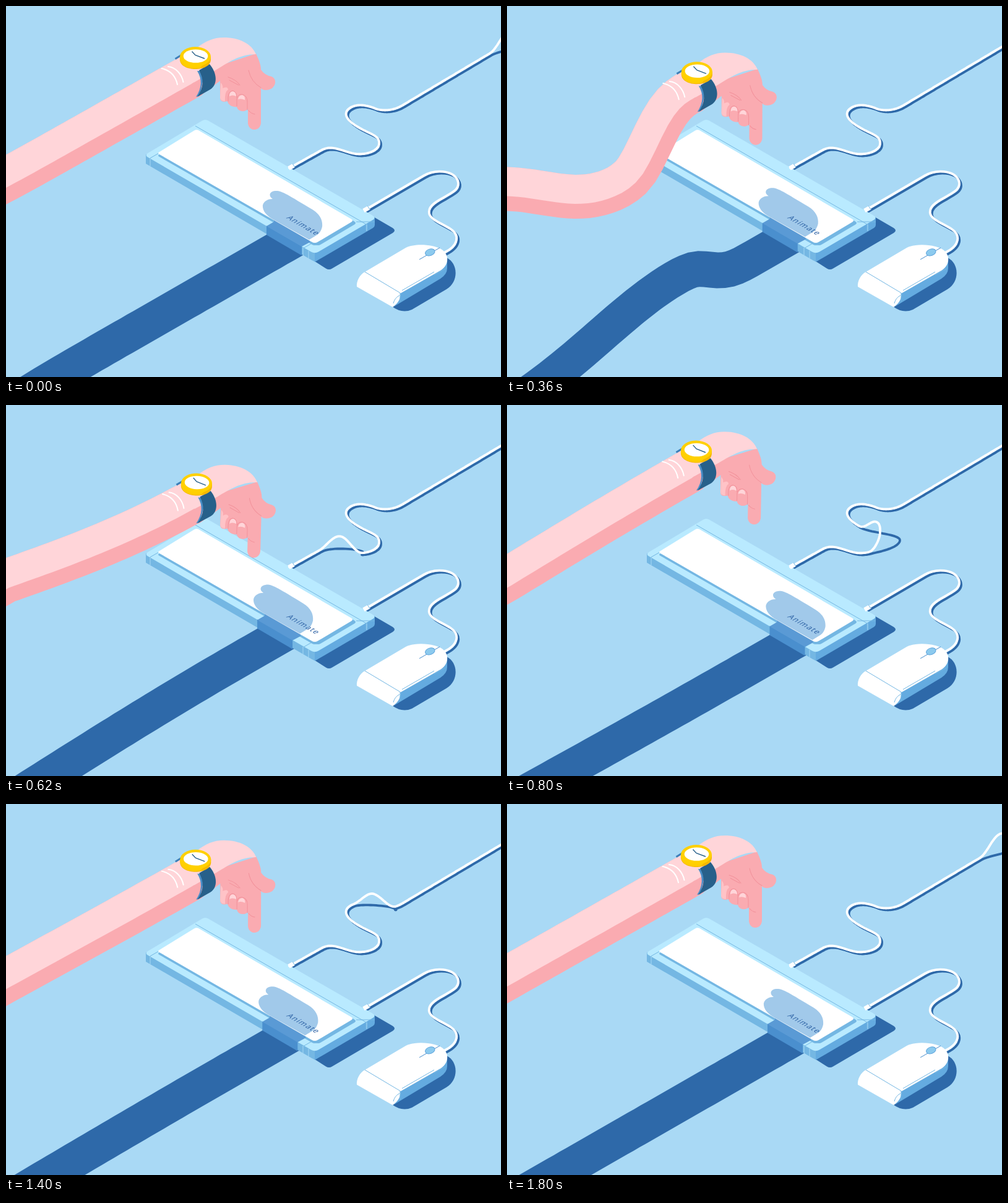
Recreate the animation shown at these times as an HTML page. Size 800 px wide and 600 px high, loop 1820 ms.

```html
<!DOCTYPE html>
<html lang="en">
<head>
<meta charset="utf-8">
<title>Tap</title>
<style>
html, body { margin: 0; width: 100%; height: 100%; overflow: hidden; background: #a9d9f5; }
svg { display: block; width: 800px; height: 600px; }
.floor { fill: #2e69a9; }
.cord, .cordShade { fill: none; stroke: #fff; stroke-width: 3.8; stroke-linecap: round; stroke-linejoin: round; }
.cordShade { stroke: #2e69a9; }
.thin { fill: none; stroke: #74b7e3; stroke-width: 1; }
.crease { fill: none; stroke: #f2929b; stroke-width: 1; stroke-linecap: round; }
.light { fill: #ffd5d9; }
.dark { fill: #faabb1; }
text { font: 12.5px "Open Sans", "Noto Sans", sans-serif; letter-spacing: 1.15px; fill: #2a5fa3; }
</style>
</head>
<body>
<svg viewBox="0 0 800 600">
  <defs>
    <path id="keyTop" d="M248 236 L304 201.500 Q308 199 312 201.500 L558 344.500 Q562 347 558 349.500 L504 381.500 Q499 384.500 494 381.500 L248 240 Q244 238 248 236Z"/>
    <clipPath id="onKey"><use href="#keyTop"/></clipPath>
    <clipPath id="onSide"><path d="M226 242 L496 399 V414 L226 256Z"/></clipPath>
    <path id="mouseCord" d="M580 330 L675 274.500 C693 264 722 265 730 282 C735 296 722 301 707 310 C690 319 682 326 684 336 C687 346 705 352 719 361 C734 371 731 388 708 399"/>
  </defs>
  <rect width="800" height="600" fill="#a9d9f5"/>

  <!-- floor shadows -->
  <path class="floor" d="M485 404 L517 424.500 Q522 427.500 527 424.500 L625 367 Q631 363 625 359 L594 341Z"/>
  <path class="floor" d="M624 486 Q640 498 656 491 L712 458 C732 446 731 416 712 407Z"/>
  <path class="floor" id="armShade"/>
  <use class="cordShade" href="#mouseCord" x="3" y="3"/>
  <path class="cordShade" id="cordShade"/>

  <!-- keyboard -->
  <path fill="#74b7e3" d="M226 240 V255 L494 411 Q500 414 500 414 V398Z"/>
  <path fill="#64abe0" d="M499 396 V414 L593 359 Q596 357 596 354 V341Z"/>
  <path fill="#b9eaff" d="M230 237.500 L317 185.500 Q322 182.500 327 185.500 L592 338.500 Q599 342.500 592 346.500 L505 397.500 Q499 401 493 397.500 L230 245 Q223 241.500 230 237.500Z"/>
  <path class="thin" d="M306 194 L582 353 V363 M233 246 L247 238 M233 246 V259 M480 392 L494 384 M566 349 L596 349"/>
  <path class="thin" style="stroke:#a5d8f5" d="M233 247 V259 M480 391 V403 M489 396 V408 M583 353 V364"/>
  <use href="#keyTop" fill="#74b7e3" x="5" y="4"/>
  <use href="#keyTop" fill="#74b7e3" y="4"/>
  <g id="sideShade" clip-path="url(#onSide)"><path class="slide" fill="#4a8fce" d="M421 354 V374 L478 407 V387Z"/></g>
  <path class="slide" fill="#5a9ad5" d="M433 343 V349 L421 356 L478 389 L491 382 V374Z"/>
  <use href="#keyTop" fill="#fff"/>
  <g clip-path="url(#onKey)"><path class="slide" fill="#a1c9ea" d="M433 346 C420 339 414 330 415 322 C417 315 424 312 431 312 C424 308 425 300 435 299 C445 298 455 305 495 329 C508 337 512 347 511 357 Q509 366 503 370 L490 378Z"/></g>
  <text transform="matrix(.866 .5 -.866 .5 452.500 343)">Animate</text>

  <!-- cables and plugs -->
  <path class="cord" id="cord"/>
  <use class="cord" href="#mouseCord"/>
  <path d="M457 262.500 L465 258 M578 331 L587 326" stroke="#fff" stroke-width="7"/>
  <path class="thin" d="M463 255 L467 261 M584 323 L588 329"/>

  <!-- mouse -->
  <path fill="#64abe0" d="M637 462 L713 408 V424 Q713 434 702 441 L627 486Z"/>
  <path fill="#fff" d="M580 430 L646 391 C662 383 690 386 703 393 C718 402 716 421 700 429 L637 465 C628 470 623 478 625 487 L567 454 C566 445 572 434 580 430Z"/>
  <path fill="#fff" d="M637 465 C638 472 635 480 625 487 C621 478 628 468 637 465Z"/>
  <path class="thin" d="M580 430 L637 464 V478 M640 460 L692 430 M692 435 L710 425 M636 468 Q628 472 626 481"/>
  <path d="M668 410 L701 391" stroke="#4a8fce" fill="none"/>
  <ellipse cx="685.500" cy="398.500" rx="8" ry="5.300" transform="rotate(-20 685 399)" fill="#8ccaee" stroke="#5fa5dc"/>

  <!-- arm and hand -->
  <path class="dark" id="armDark"/>
  <path class="light" id="armLight"/>
  <g id="hand">
    <path class="dark" d="M300 126 L340 98 L404 77 C409 88 412 95 412 103 Q418 112 429 114 C437 117 437 127 430 133 C424 137 415 137 412 133 V189 C411 203 393 204 391 190 V166 C388 172 375 172 373 163 C368 164 359 161 358 154 C350 156 346 154 346 148 V121 L312 147Z"/>
    <path class="light" d="M277 90 L282 82.500 L308 68 C322 57 335 51 352 51 C377 51 397 61 404 78 C377 78 360 91 340 103 L304 123.500Z"/>
    <path fill="#ffc3c7" d="M347 124 Q351 128 350 133 Q358 129 359 135 Q353 139 354 154 Q346 154 346 148Z"/>
    <path class="light" d="M361 146 Q361 138 367 138 Q372 139 372 146 Q366 143 361 146Z M375 151 Q376 144 382 144 Q387 146 386 152 Q380 149 375 151Z"/>
    <path class="crease" d="M359 154 Q358 138 366 137 Q373 138 373 148 M373 162 V150 Q375 142 382 143 Q390 145 390 155 V168 M359 115 Q372 119 378 128 M361 120 L376 128 M392 104 Q396 123 412 132 M392 169 Q396 174 402 175"/>
    <path d="M262 98 C274 99 284 110 286.500 123 M251.500 101 C265 104 274 113 277 127" fill="none" stroke="#fff" stroke-width="2" stroke-linecap="round"/>
    <path d="M273.500 85.500 L284 79" stroke="#3d7fb8" stroke-width="3"/>
    <path fill="#4a8ec7" d="M309 105 C317 118 317 132 307 147 L313 145 L322 105Z"/>
    <path fill="#27608a" d="M312 104 C320 118 320 132 309 147 L330 135 C343 127 341 108 329 94Z"/>
    <path fill="#f5b800" d="M281 82 V87 C282 107 330 107 331 87 V82Z"/>
    <path fill="#ffcd00" d="M281 82 V86 C284 102 305 102 314 100 L331 82Z"/>
    <ellipse cx="306" cy="82" rx="25" ry="16" fill="#ffd000"/>
    <ellipse cx="306.500" cy="81" rx="19.800" ry="10.800" fill="#fff"/>
    <path d="M300.500 73.500 L306 79.500 L321 85" fill="none" stroke="#27608a" stroke-width="1.400"/>
  </g>
</svg>
<script>
const LOOP = 1820;
const $ = id => document.getElementById(id);
const clamp = x => Math.max(0, Math.min(1, x));
const smooth = x => (1 - Math.cos(Math.PI * clamp(x))) / 2;

// Keys are [time, value] pairs.
function track(t, keys, ease = smooth) {
  let i = 1;
  while (i < keys.length - 1 && t > keys[i][0]) i++;
  const [t0, a] = keys[i - 1], [t1, b] = keys[i];
  return a + (b - a) * ease((t - t0) / (t1 - t0));
}

const DROP = [[0, 0], [300, 0], [470, 85], [800, -8.5], [1160, 11], [1820, 0]];
const SLIDE = [[0, 0], [300, 0], [470, -29], [800, 3.5], [1160, -9.5], [1820, 0]];
const SHOULDER = [[0, 0], [330, 0], [480, 6], [760, 0], [1080, 11], [1640, 0], [1820, 0]];
const TURN = [[0, 0], [330, 0], [470, 2], [800, 1], [1080, .2], [1820, 0]];
const PULSE = [[430, 8], [480, 30], [800, 172], [1080, 217], [1400, 290], [1620, 394], [1800, 516], [1820, 537], [1920, 640]];

const line = pts => "M" + pts.map(p => p[0].toFixed(1) + " " + p[1].toFixed(1)).join("L");

// Band between two offsets along the normal of y = f(x).
function band(f, x0, x1, near, far) {
  const a = [], b = [];
  for (let x = x0; x <= x1; x += 10) {
    const y = f(x), slope = (f(x + .5) - f(x - .5)), n = Math.hypot(1, slope);
    const put = (list, off) => list.push([x - slope / n * off, y + off / n]);
    put(a, near);
    put(b, far);
  }
  return line(a.concat(b.reverse())) + "Z";
}

// Travelling dip with a small counter swing ahead of it.
function ripple(x, t) {
  const u = x - (t - 240) * 1.46, v2 = (u / (u < 0 ? 210 : 140)) ** 2;
  return (1 - v2) * Math.exp(-v2) * (1 - smooth((t - 330) / 130)) * (1 - smooth((x - 200) / 95));
}
const reach = x => Math.sin(Math.PI / 2 * clamp(x));

const rail = document.createElementNS("http://www.w3.org/2000/svg", "path");
rail.setAttribute("d", "M458 262 L510 233 C530 222 550 240 572 239.500 C590 239 604 231 603 221 C603 208 585 207 563 192 C550 183 546 174 553 167 C565 156 586 161 597 166 C612 171 628 168 640 161 L830 48");
const railPoints = [];
for (let s = 0; s < rail.getTotalLength(); s += 2) {
  const p = rail.getPointAtLength(s);
  railPoints.push([p.x, p.y, s]);
}

function drawCord(t) {
  const time = t < 430 ? t + LOOP : t;
  const mid = track(time, PULSE, clamp);
  const height = 23 * track(time, [[430, 0], [480, .55], [700, 1], [1000, .85], [1920, .85]]);
  const lift = s => {
    const u = (s - mid) / 36;
    return Math.abs(u) < 1 ? height * (1 + Math.cos(Math.PI * u)) / 2 * clamp(s / 12) : 0;
  };
  $("cord").setAttribute("d", line(railPoints.map(([x, y, s]) => [x, y - lift(s)])));
  $("cordShade").setAttribute("d", line(railPoints.map(([x, y, s]) => [x + 3 + 1.4 * lift(s), y + 3])));
}

function draw(now) {
  const t = now % LOOP;
  const drop = track(t, DROP), slide = track(t, SLIDE), shoulder = track(t, SHOULDER);

  const arm = x => 282 - .5645 * x + shoulder + (drop - shoulder) * reach(x / 310) + 107 * ripple(x, t);
  $("armDark").setAttribute("d", band(arm, -200, 300, -35.5, 35.5));
  $("armLight").setAttribute("d", band(arm, -200, 300, -35.5, 11.5));

  const root = -.8 * shoulder, tip = 1.13 * slide;
  const shade = x => 644.6 - .573 * x + root + (tip - root) * reach((x - 20) / 370) - 47 * ripple(x - 95, t);
  $("armShade").setAttribute("d", band(shade, -150, 470, -29, 29));

  $("hand").setAttribute("transform", `translate(${drop * .035} ${drop}) rotate(${track(t, TURN)} 306 100)`);
  for (const part of document.querySelectorAll(".slide"))
    part.setAttribute("transform", `translate(${slide} ${slide * .56})`);
  drawCord(t);
}

const start = performance.now();
function tick() {
  draw(performance.now() - start);
  requestAnimationFrame(tick);
}
tick();
</script>
</body>
</html>
```
